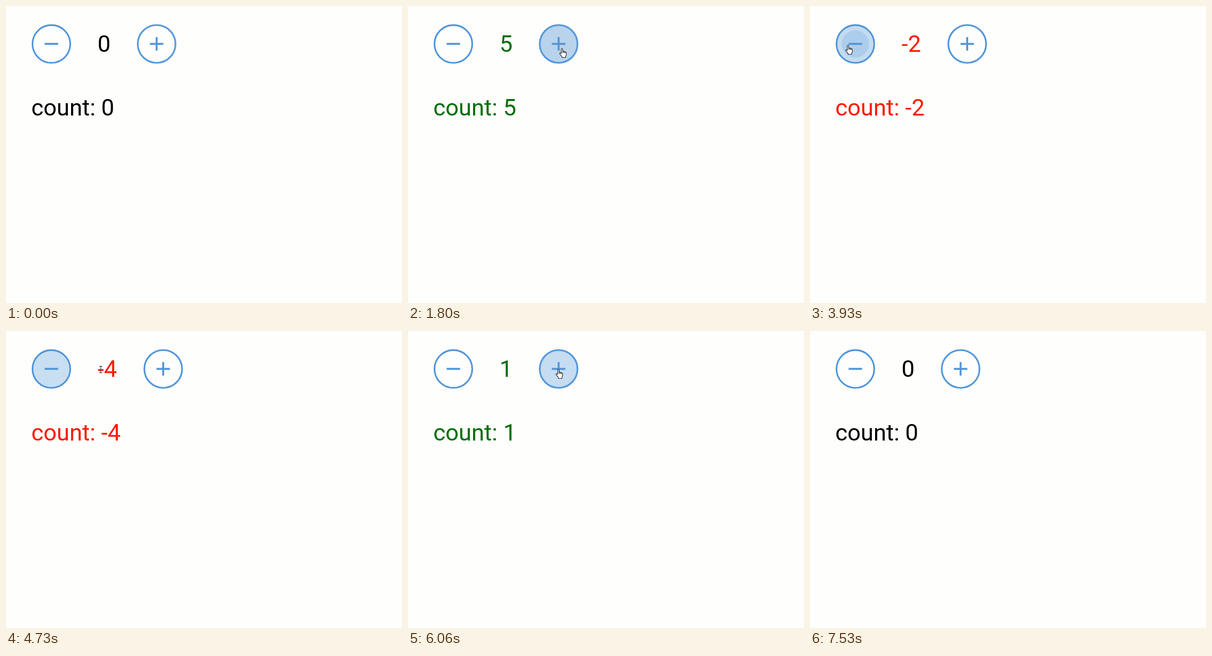
Recreate the animation shown at these times as an HTML page. Size 864 by 648 pixels, loop 7600 ms.

```html
<!DOCTYPE html>
<html lang="en">
<head>
<meta charset="utf-8">
<title>Counter</title>
<style>
  html, body { margin: 0; width: 100%; height: 100%; overflow: hidden; background: #fefefd; }
  svg { display: block; width: 864px; height: 648px; }
  text { font: 50.6px Roboto, Arial, sans-serif; white-space: pre; }
  .btn { fill: #5095d8; }
  .ring { fill: none; stroke: #5095d8; stroke-width: 3.6; }
  .tint, .ripples circle { opacity: 0; }
  #cursor > * { visibility: hidden; }
  #cursor .on { visibility: visible; }
</style>
</head>
<body>
<svg viewBox="0 0 864 648">
  <defs>
    <clipPath id="disc"><circle r="42"/></clipPath>
  </defs>
  <g id="minus" class="btn" transform="translate(99 82.8)">
    <circle class="tint" r="42"/>
    <g class="ripples" clip-path="url(#disc)"></g>
    <circle class="ring" r="41.2"/>
    <rect x="-14.7" y="-2.3" width="29.4" height="4.2"/>
  </g>
  <g id="plus" class="btn" transform="translate(328.6 82.8)">
    <circle class="tint" r="42"/>
    <g class="ripples" clip-path="url(#disc)"></g>
    <circle class="ring" r="41.2"/>
    <path d="M-14.7-2.3h12.6v-12.6h4.2v12.6h12.6v4.2h-12.6v12.6h-4.2v-12.6h-12.6z"/>
  </g>
  <g id="texts">
    <text id="value" x="199.8" y="100">0</text>
    <text id="label" x="55.2" y="238.8">count: 0</text>
  </g>
  <g id="cursor">
    <path id="arrow" fill="#fff" stroke="#000" d="M0 0v16l3.7-3.5 2.6 6 2.5-1.1-2.6-5.8h5.2z"/>
    <path id="hand" fill="#fff" stroke="#111" stroke-width="1.2" stroke-linejoin="round"
      d="M-1.5 2Q-1.5 .5 0 .5T1.5 2V7Q3.2 6 4.2 7.6 5.8 6.8 6.8 8.4 9.4 7.8 9.4 10.5V14Q9.4 16 7.8 18V20.5H.2V18.6L-4.6 12.8Q-5.6 11-4.2 10.4-3 10-1.5 12Z
         M1.5 7v3.6M4.2 7.6v3.2M6.8 8.4v2.6"/>
    <path id="beam" fill="none" stroke="#333" stroke-width="1.3" d="M-3.2-7h2.2l1 1 1-1h2.2M0-6V6M-3.2 7h2.2l1-1 1 1h2.2"/>
  </g>
</svg>
<script>
const LOOP = 7600;
const $ = id => document.getElementById(id);
const series = (start, step, n) => Array.from({ length: n }, (_, i) => start + i * step);

const clicks = {
  plus: [...series(968, 163, 5), ...series(5240, 130, 5)],
  minus: [...series(2882, 163.7, 7), 4140, 4460, 6800]
};
const hovers = {
  plus: [[800, 2537], [4800, 6400]],
  minus: [[2695, 4680], [6590, 7290]]
};

// Each stop is [time in ms, value, easing towards the next stop].
function track(el, prop, stops) {
  const all = [[0, stops[0][1]], ...stops, [LOOP, stops[stops.length - 1][1]]];
  const frames = all.map(([t, v, easing = "linear"]) => ({ offset: t / LOOP, [prop]: v, easing }));
  return el.animate(frames, { duration: LOOP, iterations: Infinity });
}

function addRipple(layer, t) {
  const c = document.createElementNS("http://www.w3.org/2000/svg", "circle");
  c.setAttribute("r", 61);
  layer.append(c);
  track(c, "transform", [[t, "scale(.2)", "cubic-bezier(.4,0,.2,1)"], [t + 225, "scale(1)"]]);
  track(c, "opacity", [[t, 0], [t + 60, .2], [t + 300, .2], [t + 400, 0]]);
}

for (const id of ["minus", "plus"]) {
  const btn = $(id), layer = btn.querySelector(".ripples");
  track(btn.querySelector(".tint"), "opacity", hovers[id].flatMap(([on, off]) => [
    [on, 0, "cubic-bezier(.25,.8,.5,1)"], [on + 300, .15],
    [off, .15, "ease-in-out"], [off + 240, 0]
  ]));
  clicks[id].forEach(t => addRipple(layer, t));
}

const at = (x, y) => `translate(${x}px, ${y}px)`;
const clock = track($("cursor"), "transform", [
  [260, at(402, 296), "ease-out"], [900, at(336, 92)],
  [2320, at(336, 92), "ease-in-out"], [2870, at(83, 85)],
  [4560, at(83, 85), "ease-in-out"], [4900, at(328, 83)],
  [6250, at(328, 83), "ease-in-out"], [6720, at(83, 85)],
  [7190, at(83, 85), "ease-in"], [7460, at(14, 100)]
]);

function cursorKind(t) {
  if (t < 260 || t >= 7460) return "";
  const over = Object.values(hovers).flat().some(([on, off]) => t >= on && t < off);
  if (over) return "hand";
  return t > 2500 && t < 7000 ? "beam" : "arrow";
}

function draw() {
  const t = (clock.currentTime || 0) % LOOP;
  const past = id => clicks[id].filter(c => c <= t).length;
  const n = past("plus") - past("minus");
  $("value").textContent = n;
  $("label").textContent = "count: " + n;
  $("texts").setAttribute("fill", n > 0 ? "#006f00" : n < 0 ? "#ff1a00" : "#000");
  $("plus").setAttribute("transform", `translate(${n < 0 ? 343 : 328.6} 82.8)`);
  const kind = cursorKind(t);
  for (const c of $("cursor").children) c.classList.toggle("on", c.id === kind);
  requestAnimationFrame(draw);
}
draw();
</script>
</body>
</html>
```
